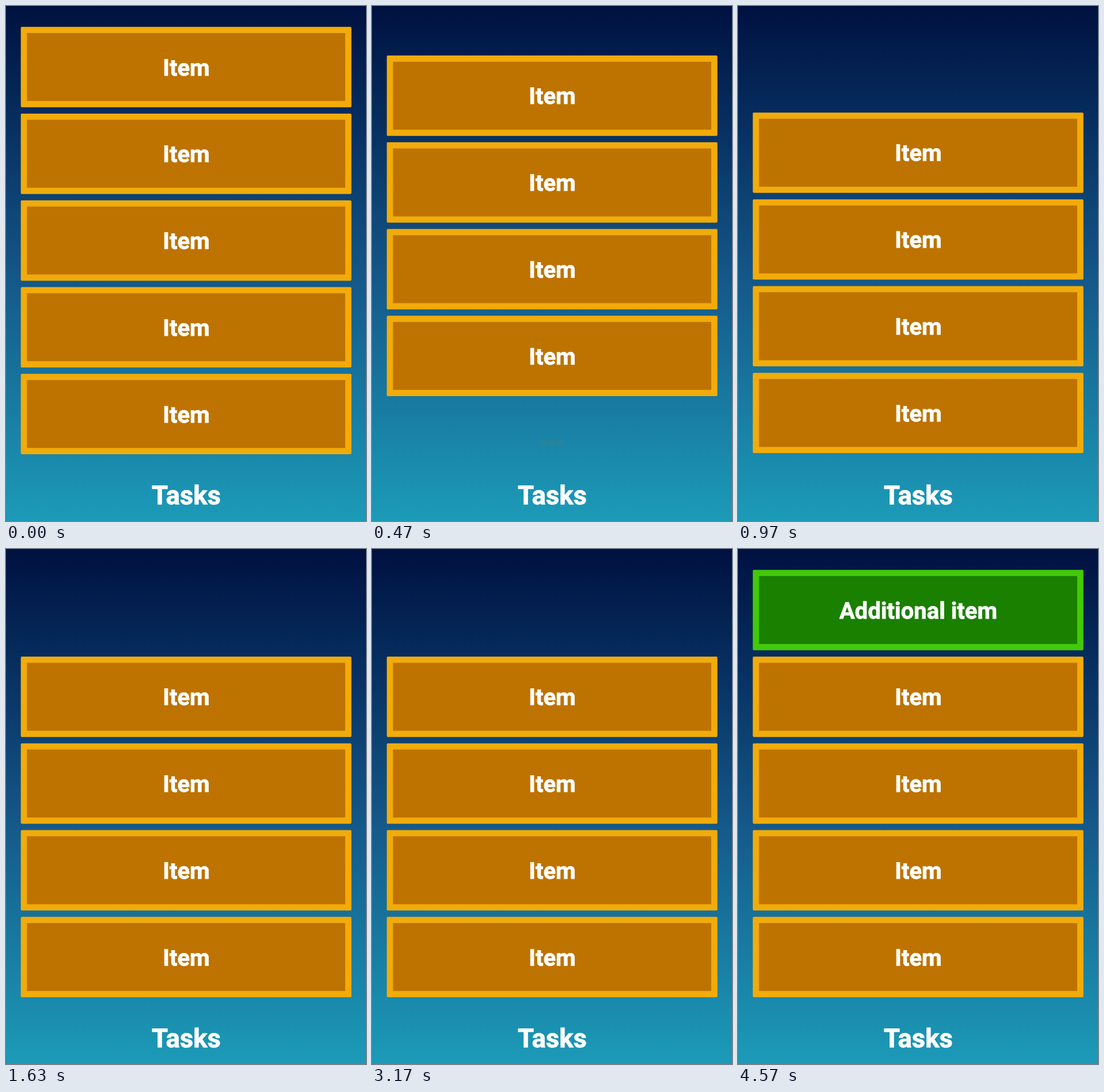
Recreate the animation shown at these times as an HTML page. Size 625 by 895 pixels, loop 4.61 s.

```html
<!DOCTYPE html>
<html lang="en">
<head>
<meta charset="utf-8">
<title>Tasks</title>
<style>
  html, body {
    margin: 0;
    width: 100%;
    height: 100%;
    overflow: hidden;
  }
  body {
    background: linear-gradient(#001140, #052b5c 20%, #14598a 54%, #1c9bb8);
  }
  svg {
    display: block;
    width: 100%;
    height: 100%;
  }
  text {
    fill: #fff;
    stroke: #fff;
    stroke-width: .8px;
    font: bold 40px Roboto, sans-serif;
    text-anchor: middle;
    text-rendering: geometricPrecision;
  }
  .title {
    font-size: 45.5px;
  }
  .item {
    transform-box: fill-box;
    transform-origin: center;
  }
  .edge { fill: #f1ab0a; }
  .face { fill: #be7300; }
  .extra .edge { fill: #42c908; }
  .extra .face { fill: #1a8000; }
</style>
</head>
<body>
<svg viewBox="0 0 625 895">
  <g class="list"></g>
  <text class="title" x="313" y="866">Tasks</text>
</svg>
<script>
  const LOOP = 4610, REMOVE = 303, ADD = 3397, SLIDE = 780, FADE = 250;
  const LEFT = 25.7, TOP = 36.2, WIDTH = 574, HEIGHT = 139.7, PITCH = 150.75, BORDER = 10.8;
  const svg = document.querySelector('svg');
  const list = document.querySelector('.list');

  function add(parent, tag, attrs) {
    const el = document.createElementNS('http://www.w3.org/2000/svg', tag);
    for (const name in attrs) el.setAttribute(name, attrs[name]);
    return parent.appendChild(el);
  }

  function addBox(parent, kind, y, inset) {
    add(parent, 'rect', {
      class: kind, x: LEFT + inset, y: y + inset,
      width: WIDTH - 2 * inset, height: HEIGHT - 2 * inset, rx: inset ? 0 : 2
    });
  }

  function addItem(parent, y, label, kind = '') {
    const item = add(parent, 'g', { class: `item ${kind}` });
    addBox(item, 'edge', y, 0);
    addBox(item, 'face', y, BORDER);
    add(item, 'text', { x: LEFT + WIDTH / 2 + .3, y: y + HEIGHT / 2 + 14.5 }).textContent = label;
    return item;
  }

  // Holds one state, eases to the next, then holds that until the loop ends.
  function change(el, from, to, start, length) {
    el.animate([
      { ...from, offset: 0 },
      { ...from, offset: start / LOOP, easing: 'ease' },
      { ...to, offset: (start + length) / LOOP },
      { ...to, offset: 1 }
    ], { duration: LOOP, iterations: Infinity });
  }

  const items = Array.from({ length: 5 }, (_, i) => addItem(list, TOP + i * PITCH, 'Item'));
  const extra = addItem(svg, TOP, 'Additional item', 'extra');

  const shown = { transform: 'scale(1)', opacity: 1 };
  const hidden = { transform: 'scale(0)', opacity: 0 };

  change(list, { transform: 'translateY(0)' }, { transform: `translateY(${PITCH}px)` }, REMOVE, SLIDE);
  change(items[4], shown, hidden, REMOVE, FADE);
  change(extra, hidden, shown, ADD, FADE);
</script>
</body>
</html>
```
